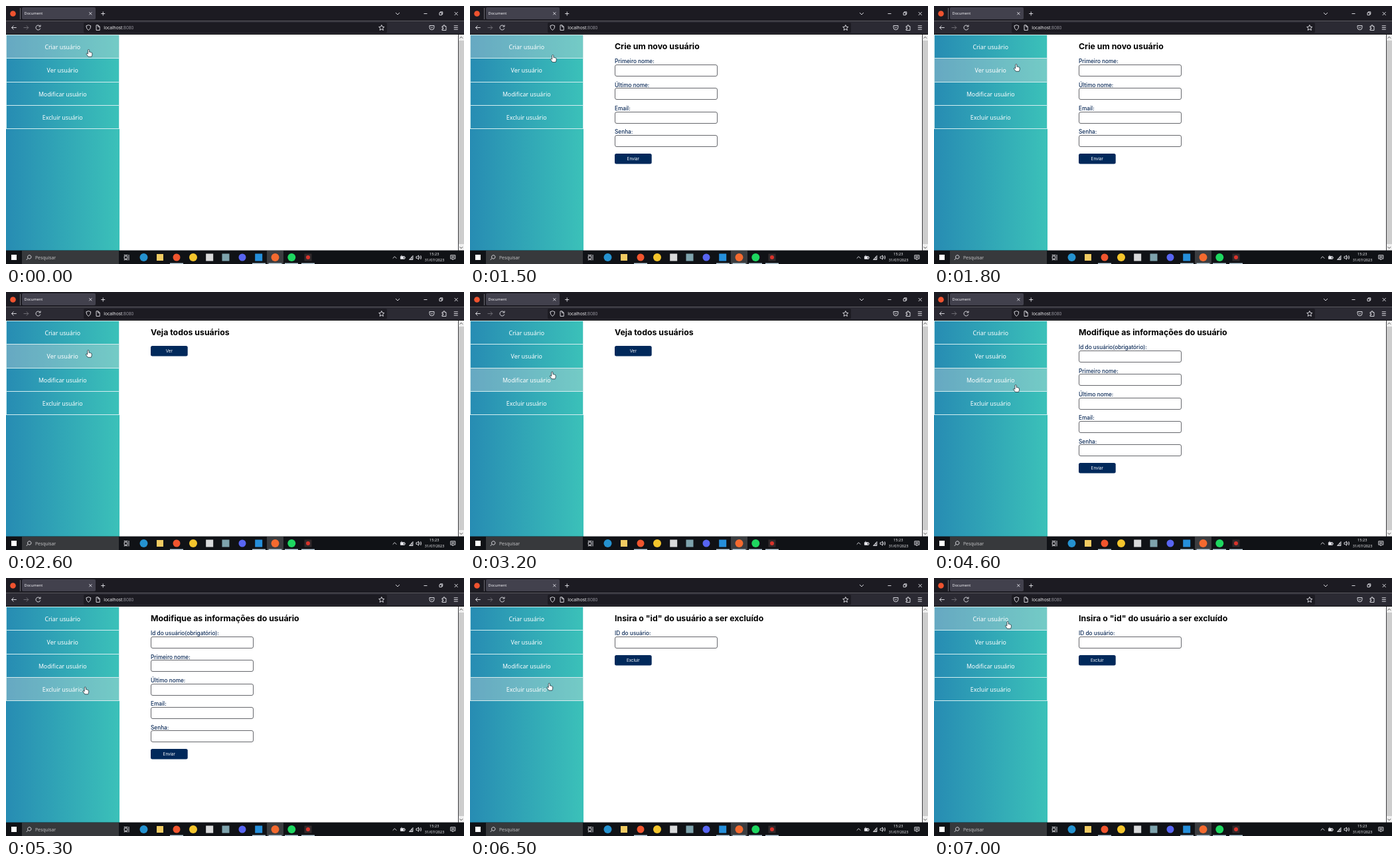
Write an HTML page that moves like this. It is 690 by 388 pixels and loops after 7500 ms.

```html
<!DOCTYPE html>
<html lang="pt-BR">
<head>
<meta charset="utf-8">
<title>Document</title>
<style>
html, body { margin: 0; width: 100%; height: 100%; overflow: hidden; background: #fff; }
svg { display: block; width: 690px; height: 388px; }
text { font-family: "Open Sans", sans-serif; fill: #fbfbfe; }
.line { fill: none; stroke: #e8e8ee; stroke-width: .9; }
.dim { stroke: #75747c; }
.menu { font: 500 8.8px "Noto Sans", sans-serif; text-anchor: middle; fill: #fff; }
.title { font: bold 12.33px Inter, sans-serif; fill: #000; }
.label { font: 500 8.25px Inter, sans-serif; fill: #0b2a57; }
.field { fill: #fff; stroke: #55565c; stroke-width: .9; }
.send { font: 6.3px Inter, sans-serif; text-anchor: middle; }
.clock { font-size: 5.6px; text-anchor: middle; }
</style>
</head>
<body>
<svg id="stage" viewBox="0 0 690 388">
  <defs>
    <linearGradient id="sea"><stop stop-color="#278cb3"/><stop offset="1" stop-color="#3bc1b9"/></linearGradient>
  </defs>
  <rect width="690" height="388" fill="#fff"/>

  <!-- browser bars -->
  <rect width="690" height="22.5" fill="#1c1b22"/>
  <rect y="22.5" width="690" height="20.5" fill="#2b2a33"/>
  <rect y="42" width="690" height="1" fill="#0c0c0d"/>
  <circle cx="10.5" cy="11.5" r="4.3" fill="#f0532f"/>
  <path class="line dim" d="M21.5 3V20"/>
  <rect x="24" y="2" width="111" height="18" rx="2" fill="#42414d"/>
  <text x="27.5" y="13.4" font-size="5.7">Document</text>
  <path class="line" d="M125.3 9.3l4 4m0-4l-4 4M143.2 11.5h6m-3-3v6M587 10l3 3 3-3M629.5 11.5h5M675.7 9l5 5m0-5l-5 5"/>
  <path class="line" d="M653 10h3.6v3.6H653ZM654.2 10V8.8h3.6v3.6h-1.2"/>
  <path class="line" d="M15.8 32.5H8.5l3-3m-3 3l3 3M51.2 30.3a3.5 3.5 0 1 0 .6 3.3M52 28.5v2.5h-2.6"/>
  <path class="line dim" d="M26.5 32.5h7.3l-3-3m3 3l-3 3"/>
  <rect x="117" y="25" width="457" height="15.5" rx="2" fill="#1c1b22"/>
  <path class="line" d="M124.3 28.6l3.4 1.2q.2 4.4-3.4 6.7-3.6-2.3-3.4-6.7ZM136 28.8h3l2.2 2.2v5.4H136ZM138.8 29v2.3h2.3"/>
  <text x="147.3" y="35" font-size="6.7">localhost<tspan fill="#9b9aa3">:8080</tspan></text>
  <path class="line" d="M565.8 28.5l1.2 2.7 2.9.3-2.2 2 .7 2.9-2.6-1.5-2.6 1.5.7-2.9-2.2-2 2.9-.3Z"/>
  <path class="line" d="M638 29.5h7v2.8a3.5 3.5 0 0 1-7 0ZM639.8 31.6l1.7 1.6 1.7-1.6"/>
  <path class="line" d="M657 30.5h2v-1.6h2v1.6h2v6h-6v-2h1.6v-2H657ZM674.8 29.8h6m-6 2.7h6m-6 2.7h6"/>

  <!-- page -->
  <rect y="43" width="171" height="325" fill="url(#sea)"/>
  <g id="menu"></g>
  <g id="pages"></g>
  <rect x="681" y="43" width="9" height="325" fill="#f0f0f0"/>
  <rect x="682" y="52" width="8" height="306" fill="#cdcdcd"/>
  <path d="M681.5 43V368" stroke="#3c3c40"/>
  <path d="M683.5 48.6l2.3-2.3 2.3 2.3M683.5 362.2l2.3 2.3 2.3-2.3" fill="none" stroke="#505050"/>

  <!-- taskbar -->
  <rect y="367.5" width="690" height="20.5" fill="#101216"/>
  <rect x="8" y="374" width="8" height="8" fill="#fff"/>
  <rect x="24" y="368" width="146" height="20" fill="#37393c"/>
  <path class="line" d="M33.2 379.2a2.7 2.7 0 1 1 .3.3ZM33.2 379.2l-2.4 2.7"/>
  <text x="44" y="380.6" font-size="6.8" style="fill:#c9c9cb">Pesquisar</text>
  <path class="line" d="M178.2 376.2h4.6v3.8h-4.6ZM178.2 373.8v.9h4.6v-.9M178.2 382.4v-.9h4.6v.9M185 374v8.4"/>
  <g id="apps"></g>
  <path class="line" d="M582.7 379.6l2.8-2.8 2.8 2.8M607.5 381.5l5.5-6v6ZM609.7 379v2.5M611.5 377v4.5"/>
  <path class="line" d="M594.4 376.6h6v3.8h-6ZM601.3 377.6v1.8M596 376.3v-1.6M618 376.8h1.5l2-1.8v6.2l-2-1.8H618ZM623 376.4q1.3 1.7 0 3.4M624.7 375.2q2 2.9 0 5.8"/>
  <rect x="594.6" y="377" width="4.5" height="3" fill="#e8e8ee"/>
  <text class="clock" x="645.2" y="375.4">15:23</text>
  <text class="clock" x="645.6" y="384.4">31/07/2023</text>
  <path class="line" d="M669.8 374.8h7v5.4h-2.2l-1.6 1.8v-1.8h-3.2ZM671.2 376.7h4.2M671.2 378.4h4.2"/>

  <path id="hand" fill="#fff" stroke="#16242c" stroke-width=".8" stroke-linejoin="round"
    d="M-1.2 7V.9Q-1.1 0 0 0 1.1 0 1.2.9V4Q2.6 3.5 3 4.4 4.2 4 4.5 5 5.7 4.9 5.7 6V8.3Q5.5 9.8 4.7 11.5H-.6Q-2 9.4-3.5 7.5-4.1 6.4-3.1 6.1-2 6-1.2 7Z"/>
</svg>
<script>
const $ = id => document.getElementById(id);
const LOOP = 7500, TOP = 43, ROW = 35.35;
const rowY = (y, i) => Math.round(y + i * ROW);

const items = ['Criar', 'Ver', 'Modificar', 'Excluir'];
const person = ['Primeiro nome:', 'Último nome:', 'Email:', 'Senha:'];
const pages = [
  { start: 900, title: 'Crie um novo usuário', fields: person, action: 'Enviar' },
  { start: 2600, title: 'Veja todos usuários', fields: [], action: 'Ver' },
  { start: 4200, title: 'Modifique as informações do usuário',
    fields: ['Id do usuário(obrigatório):', ...person], action: 'Enviar' },
  { start: 6000, title: 'Insira o "id" do usuário a ser excluído', fields: ['ID do usuário:'], action: 'Excluir' }
];

// fingertip path: time, x, y
const path = [
  [0, 124.5, 65.5], [800, 124.5, 65.5], [1200, 124.7, 68], [1400, 124.7, 68],
  [1500, 124.7, 73.6], [1800, 123.8, 87.5], [2700, 123.8, 87.5], [3300, 123.8, 126.5],
  [3500, 123.8, 127.5], [4400, 123.8, 127.5], [4900, 122, 158], [5300, 119.3, 164],
  [6400, 119.3, 164], [6500, 119.3, 158.3], [6700, 112.5, 71], [7000, 111, 65.5], [LOOP, 111, 65.5]
];

$('menu').innerHTML = items.map((name, i) => {
  const y = rowY(TOP, i);
  const box = `x=".5" y="${y + .5}" width="170" height="${rowY(TOP, i + 1) - y}"`;
  return `<rect ${box} fill="url(#sea)" stroke="#d3eef0"/>
    <rect class="glow" ${box} fill="#dcdcdc" fill-opacity=".35"/>
    <text class="menu" x="85.2" y="${64.9 + i * ROW}">${name} usuário</text>`;
}).join('');

$('pages').innerHTML = pages.map(({ title, fields, action }) => {
  const inputs = fields.map((label, i) => `
    <text class="label" x="218" y="${86.4 + i * ROW}">${label}</text>
    <rect class="field" x="218.5" y="${rowY(88, i) + .5}" width="154" height="17" rx="2.5"/>`).join('');
  const y = rowY(80.6, fields.length);
  return `<g><text class="title" x="218" y="65.3">${title}</text>${inputs}
    <rect x="218" y="${y}" width="55.7" height="15.4" rx="2.5" fill="#01295b"/>
    <text class="send" x="245.8" y="${y + 9.9}">${action}</text></g>`;
}).join('');

const dot = (x, color, r = 6) => `<circle cx="${x}" cy="378" r="${r}" fill="${color}"/>`;
const tile = (x, color, s = 11) =>
  `<rect x="${x - s / 2}" y="${378 - s / 2}" width="${s}" height="${s}" fill="${color}"/>`;
const underline = x => `<rect x="${x - 10}" y="386.6" width="20" height="1.4" fill="#c4d9e6"/>`;

$('apps').innerHTML = '<rect x="393" y="368" width="25" height="20" fill="#3b3d40"/>' +
  dot(207.5, '#2592d0') + tile(232, '#f2cb62', 10) + dot(257, '#f1552e', 5.5) + dot(282, '#f4c52c') +
  tile(306.7, '#d9dadb') + tile(331, '#7ea3ad') + dot(356, '#5865f2', 5.5) + tile(380.7, '#258fdb') +
  dot(405.5, '#f46a2f') + dot(430.3, '#1ed760') + tile(455, '#30292b') + dot(455, '#d9332b', 3) +
  [257, 381, 405.5, 430, 455].map(underline).join('');

const glows = [...document.querySelectorAll('.glow')];
const forms = [...$('pages').children];
const show = (el, on) => el.setAttribute('visibility', on ? 'visible' : 'hidden');

function handAt(t) {
  const i = path.findIndex(p => p[0] > t);
  const [t0, x0, y0] = path[i - 1], [t1, x1, y1] = path[i];
  const k = (t - t0) / (t1 - t0);
  return [x0 + (x1 - x0) * k, y0 + (y1 - y0) * k];
}

function draw(now) {
  const t = Math.floor(now % LOOP / 100) * 100;
  const [x, y] = handAt(t);
  const hover = Math.floor((y - TOP) / ROW);
  const page = pages.filter(p => p.start <= t).length - 1;
  $('hand').setAttribute('transform', `translate(${x} ${y}) scale(.94)`);
  glows.forEach((el, i) => show(el, i === hover));
  forms.forEach((el, i) => show(el, i === page));
}

const begin = performance.now();
function tick() {
  draw(performance.now() - begin);
  requestAnimationFrame(tick);
}
tick();
</script>
</body>
</html>
```
